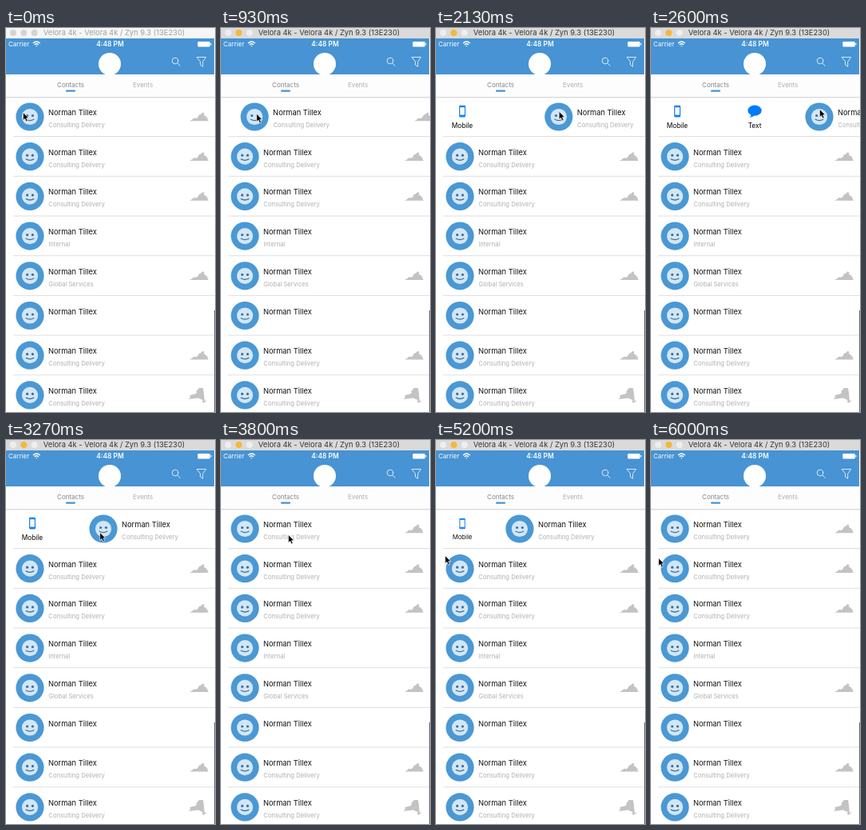
Write an HTML page that moves like this. It is 262 px wide and 480 px high and loops after 6.07 s.

```html
<!DOCTYPE html>
<html lang="en">
<head>
<meta charset="utf-8">
<title>Swipe contacts</title>
<style>
  html, body { margin: 0; width: 100%; height: 100%; overflow: hidden; background: #fff; }
  svg { display: block; width: 262px; height: 480px; font-family: Inter, "Liberation Sans", sans-serif; }
  .mid { text-anchor: middle; }
  .name { font-size: 9.3px; fill: #111; }
  .sub { font-size: 7.65px; fill: #b0b0b0; }
  .tab { font-size: 8px; }
  .label { font-size: 8.3px; }
  .line { fill: none; stroke: #fff; stroke-linecap: round; stroke-linejoin: round; }
</style>
</head>
<body>
<svg viewBox="0 0 262 480">
  <defs>
    <g id="avatar">
      <circle r="17.6" fill="#4a98d4"/>
      <circle r="10.1" fill="#d3e6f5"/>
      <circle cx="-3.4" cy="-1.5" r="1.6" fill="#37709f"/>
      <circle cx="3.4" cy="-1.5" r="1.6" fill="#37709f"/>
      <path d="M-4.8 3.2Q0 6 4.8 3.2" fill="none" stroke="#37709f" stroke-width="1.3" stroke-linecap="round"/>
    </g>
    <path id="va" fill="#c3c3c3" d="M-12 5.3L-9 3.8L-6.5 1.5L-3.5 2L-1.5 .5L0 -2.5L2 -3L4.5 -5.5L6.5 -4.5L6 -2L9 -.5L9.5 1.5L11 1L10.5 3L12 5.3Z"/>
    <path id="ny" fill="#c3c3c3" d="M-13 5L-11 2.5L-11.5 0L-5 -1.5L-3 -3L-3.5 -5L0 -9H5L6 -3L6.5 3L7 7L10 6.5L6 9.5L4 9L4.5 6L1 4.5L-1 3.5Z"/>
  </defs>

  <rect width="262" height="480" fill="#fff"/>
  <g id="list"></g>

  <rect y="86" width="262" height="50" fill="#fff"/>
  <g id="mobile">
    <rect x="-4" y="-14.2" width="8" height="14.6" rx="1.3" fill="#1580fb"/>
    <rect x="-2.8" y="-11.8" width="5.6" height="9.4" fill="#fff"/>
    <text class="label mid" y="14">Mobile</text>
  </g>
  <g id="text">
    <ellipse cy="-7.8" rx="8.6" ry="6.6" fill="#007aff"/>
    <path d="M-5 -4Q-4 -1 -6.4 .8Q-2.5 .6 0 -2Z" fill="#007aff"/>
    <text class="label mid" y="14">Text</text>
  </g>
  <g id="cell"></g>
  <path d="M9 135.6H262" stroke="#dfdfdf"/>

  <rect y="58" width="262" height="28" fill="#fdfdfd"/>
  <path d="M0 86.5H262" stroke="#dadada"/>
  <path d="M0 87.5H262" stroke="#f1f1f1"/>
  <text class="tab mid" x="81" y="73.8" fill="#858585">Contacts</text>
  <text class="tab mid" x="171.7" y="73.8" fill="#aeaeae">Events</text>
  <rect x="75" y="77.6" width="12" height="2.2" rx="1" fill="#4793d3"/>

  <rect y="11" width="261" height="47" fill="#4793d3"/>
  <text x="3" y="23.2" font-size="8" fill="#fff">Carrier</text>
  <g class="line" stroke-width="1.3">
    <path d="M34.3 18.7Q38.3 15.3 42.3 18.7M36 20.7Q38.3 18.8 40.6 20.7M38.2 22.7h.2"/>
  </g>
  <text class="mid" x="130.5" y="23.3" font-size="8.4" font-weight="600" fill="#fff">4:48 PM</text>
  <rect x="240.3" y="17" width="15.4" height="6.4" rx="1.2" fill="#fff"/>
  <rect x="256.2" y="19" width="1.2" height="2.4" fill="#fff"/>
  <circle cx="130" cy="45" r="14" fill="#fff"/>
  <g class="line" stroke-width=".9" opacity=".88">
    <circle cx="212" cy="41" r="3.8"/>
    <path d="M214.8 43.8L218.2 47.3"/>
    <path d="M239.5 36.5H250.7L246.7 42.2V48.2L243.5 46V42.2Z"/>
  </g>

  <rect id="bar" width="262" height="13"/>
  <g id="lights"><circle cx="9" cy="6" r="4"/><circle cx="22.3" cy="6" r="4"/><circle cx="35.7" cy="6" r="4"/></g>
  <text id="title" class="mid" x="135.5" y="9.3" font-size="9.4">Velora 4k - Velora 4k / Zyn 9.3 (13E230)</text>
  <path d="M261.6 353V480" stroke="#333" stroke-width=".8"/>

  <path id="cursor" d="M0 0V10L2.3 7.9L4 11.6L5.8 10.8L4.2 7.2H7.2Z" fill="#000" stroke="#fff" stroke-width=".7"/>
</svg>
<script>
const $ = id => document.getElementById(id);
const LOOP = 6070, STEP = 200 / 3, PITCH = 49.7;
const CD = 'Consulting Delivery';
const rows = [[CD, 'va'], [CD, 'va'], [CD, 'va'], ['Internal'], ['Global Services', 'va'], [''], [CD, 'va'], [CD, 'ny']];

function row([sub, map], i) {
  const y = 111 + i * PITCH;
  return `<g transform="translate(0 ${y})">
    <rect y="-24" width="262" height="48" fill="#fff"/>
    <use href="#avatar" x="30"/>
    <text class="name" x="53" y="-2">Norman Tillex</text>
    <text class="sub" x="53.3" y="12.9">${sub}</text>
    ${map ? `<use href="#${map}" x="242"/>` : ''}
    <path d="M9 24.6H262" stroke="#dfdfdf"/></g>`;
}
$('list').innerHTML = rows.slice(1).map((r, i) => row(r, i + 1)).join('');
$('cell').innerHTML = row(rows[0], 0);

// [time, value] keys
const swipe = [[0, 0], [730, 0], [1400, 55], [1670, 55], [2270, 146], [2600, 181], [2930, 141], [3270, 91.5],
  [3800, 0], [4200, 106], [4330, 106], [4400, 112], [4530, 115], [4850, 115], [5730, 0], [LOOP, 0]];
const mouse = [[0, 22, 106], [730, 31, 108], [1400, 86, 107], [1670, 86, 107], [2270, 177, 104], [2600, 212, 102],
  [2930, 171, 108], [3270, 118, 116], [3800, 85, 119], [4200, 191, 121], [4330, 191, 121], [4400, 197, 121],
  [4530, 200, 121], [4930, 12, 122], [5200, 12, 145], [5600, 10, 148], [LOOP, 10, 148]];

// Smooth curve through the keys that never overshoots
function curve(keys, t, c = 1) {
  const slope = i => keys[i + 1] && keys[i] ? (keys[i + 1][c] - keys[i][c]) / (keys[i + 1][0] - keys[i][0]) : 0;
  const tangent = i => {
    const a = slope(i - 1), b = slope(i);
    return a * b > 0 ? 2 * a * b / (a + b) : 0;
  };
  const i = keys.findIndex((k, n) => n === keys.length - 2 || t < keys[n + 1][0]);
  const p = keys[i], q = keys[i + 1], d = q[0] - p[0], u = (t - p[0]) / d, v = 1 - u;
  return p[c] * v * v * (1 + 2 * u) + q[c] * u * u * (3 - 2 * u) + d * u * v * (tangent(i) * v - tangent(i + 1) * u);
}

function action(id, x, amount) {
  const s = Math.max(0, Math.min(1, amount));
  $(id).setAttribute('transform', `translate(${x} 111) scale(${s})`);
  $(id).setAttribute('opacity', s);
}

function draw(now) {
  const t = Math.floor((now % LOOP + 4) / STEP) * STEP;
  const off = curve(swipe, t), active = t > 390;
  $('cell').setAttribute('transform', `translate(${off} 0)`);
  action('mobile', 33, off / 80);
  action('text', 130, (off - 97) / 80);
  $('cursor').setAttribute('transform', `translate(${curve(mouse, t) - 0.6} ${curve(mouse, t, 2) - 0.5})`);
  $('bar').setAttribute('fill', active ? '#dadada' : '#f6f6f6');
  $('title').setAttribute('fill', active ? '#363636' : '#a0a0a0');
  const fills = active ? ['#eee', '#f6b73c', '#eee'] : ['#d4d4d4', '#d4d4d4', '#d4d4d4'];
  [...$('lights').children].forEach((dot, i) => dot.setAttribute('fill', fills[i]));
  requestAnimationFrame(draw);
}
draw(0);
</script>
</body>
</html>
```
